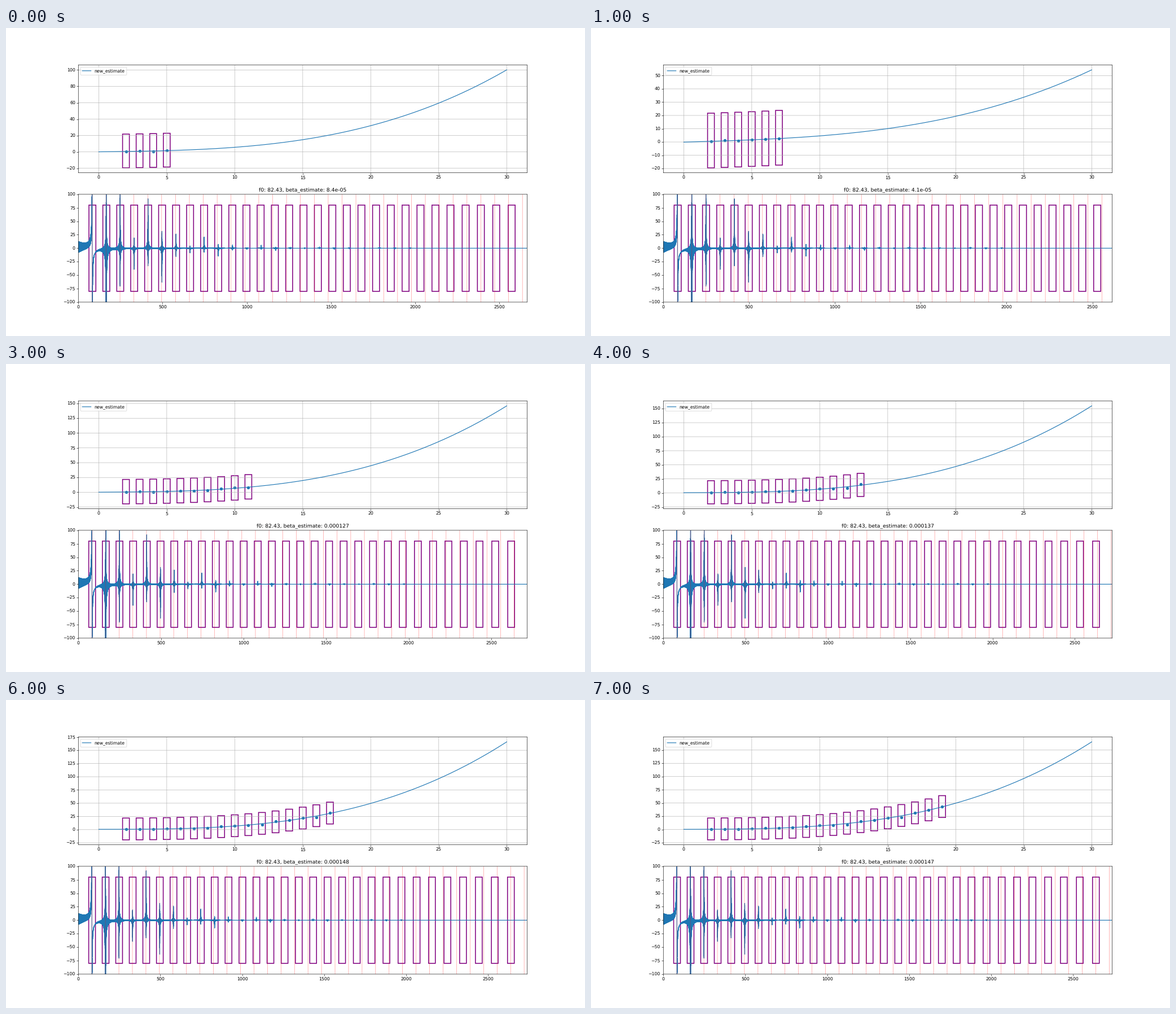
A matplotlib script for the animation above (8000 ms loop, 1026 by 546 pixels).

```python
import numpy as np
import matplotlib.pyplot as plt
from matplotlib.animation import FuncAnimation
from matplotlib.patches import Rectangle

# Unsnapped strokes and unhinted glyphs keep positions true at this low dpi.
plt.rcParams["path.snap"] = False
plt.rcParams["text.hinting"] = "none"

W, H, DPI = 1026, 546, 55.52
F0 = 82.43
PARTIALS = 30
BOX = F0 / 2

# Inharmonicity found in each step; every step measures two more partials.
BETAS = [8.44e-5, 4.08e-5, 1.652e-4, 1.274e-4,
         1.37e-4, 1.533e-4, 1.4849e-4, 1.473e-4]
# Measured deviation of partials 2, 3, 4, ...
DEVIATIONS = np.array([0.4, 1.2, 0.7, 1.7, 2.35, 2.4, 3.5, 5.7, 7.7,
                       8.0, 8.9, 15.4, 17.9, 22.4, 23.4, 32.0, 37.2, 43.0])


def measured(step):
    count = 4 + 2 * step
    return np.arange(2, 2 + count), DEVIATIONS[:count]


def estimate(step):
    """Cubic set by beta, with its linear part fitted to the measurements."""
    k, values = measured(step)
    cubic = BETAS[step] * F0 / 2
    slope, offset = np.polyfit(k, values - cubic * k**3, 1)
    return np.poly1d([cubic, 0, slope, offset])


def make_spectrum(step=0.2):
    curve = estimate(len(BETAS) - 1)
    freq = np.arange(0, 2850, step)
    sign = np.where(np.arange(freq.size) % 2 == 0, 1, -1)
    wave = sign * 9.5 * np.exp(-freq / 60)

    # The fundamental flips sign as it passes through resonance.
    d = freq - F0 - 0.05
    wave += (np.clip(-190 / d, -400, 400) * (1 + 0.25 * sign)
             * np.exp(-freq / 400))

    # Higher partials decay, with every fourth one weakened.
    for k in range(2, 24):
        d = np.abs(freq - k * F0 - curve(k))
        size = 1 + 400 * np.exp(-k / 2.6)
        if k % 2:
            up, down = 1.25 + 0.3 * np.sin(k * np.pi / 2), 0.55
        else:
            size *= 1 - 0.55 * np.cos(k * np.pi / 2)
            up, down = 0.5, 1
        envelope = size * 0.6 / (np.maximum(d - step, 0) + 0.6)
        wave += np.where(sign > 0, up, -down) * envelope * np.exp(-d / 40)
    return freq, wave


FREQ, WAVE = make_spectrum()

fig, (top, bottom) = plt.subplots(
    2, 1, figsize=((W + 0.01) / DPI, (H + 0.01) / DPI), dpi=DPI)


def add_box(ax, x, y, width, height):
    ax.add_patch(Rectangle((x, y), width, height, fill=False,
                           edgecolor="purple", linewidth=2))


def draw_estimate(step, curve):
    top.clear()
    orders, values = measured(step)
    k = np.linspace(0, PARTIALS, 301)
    top.plot(k, curve(k), label="new_estimate")
    top.scatter(orders, values, color="C0")
    for order in orders:
        add_box(top, order - 0.25, curve(order) - 20, 0.5, BOX)
    low, high = curve(2) - 20, curve(PARTIALS)
    margin = 0.05 * (high - low)
    top.set_xlim(-1.5, 31.5)
    top.set_ylim(low - margin, high + margin)
    top.grid(True)
    top.legend(loc="upper left")


def draw_spectrum(step, curve):
    bottom.clear()
    bottom.plot(FREQ, WAVE, color="C0")
    for k in range(1, PARTIALS + 1):
        add_box(bottom, k * F0 + curve(k) - 20, -80, BOX, 160)
    for k in range(1, PARTIALS + 5):
        bottom.axvline(k * F0, color="red", alpha=0.45, linewidth=0.8)
    last = PARTIALS + 1
    bottom.set_xlim(0, last * F0 + curve(last))
    bottom.set_ylim(-100, 100)
    bottom.set_title(f"f0: {F0}, beta_estimate: {round(BETAS[step], 6)}")


def update(step):
    curve = estimate(step)
    draw_estimate(step, curve)
    draw_spectrum(step, curve)
    return []


anim = FuncAnimation(fig, update, frames=len(BETAS), interval=1000, repeat=True)
plt.show()
```
